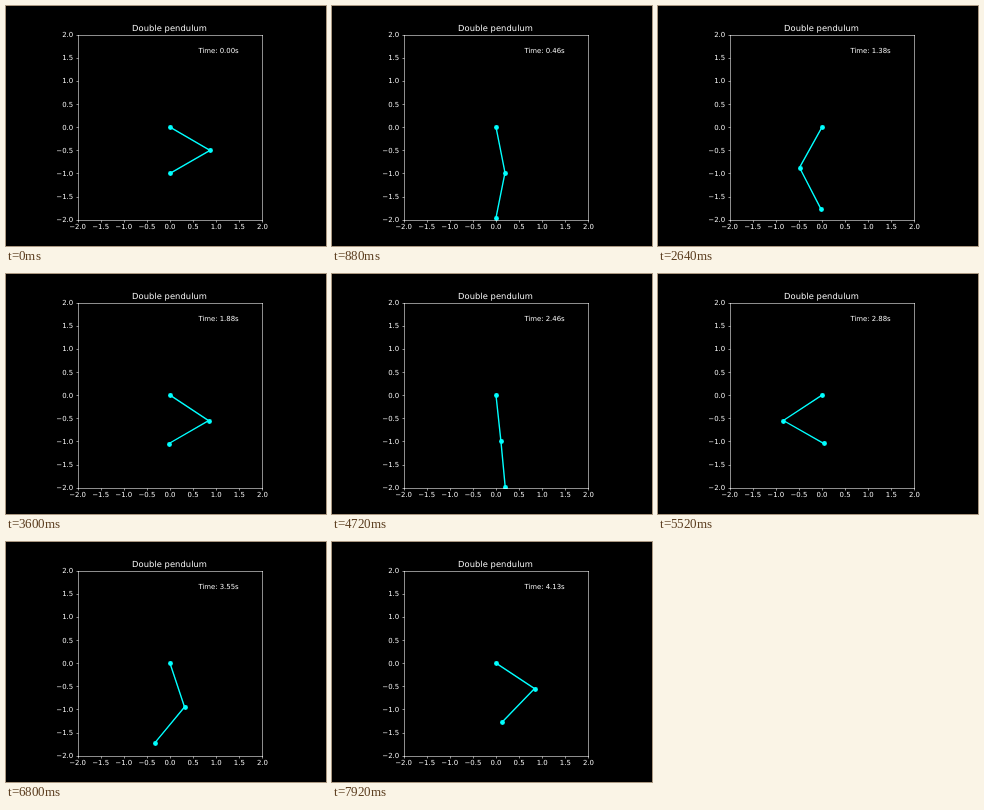
Write an HTML page that moves like this. It is 320 px wide and 240 px high and loops after 8 s.

```html
<!DOCTYPE html>
<html lang="en">
<head>
<meta charset="utf-8">
<title>Double pendulum</title>
<style>
  html, body { margin: 0; width: 100%; height: 100%; overflow: hidden; background: #000; }
  svg { display: block; width: 320px; height: 240px; }
  text { font: 6.944px "DejaVu Sans", sans-serif; fill: #fff; text-rendering: geometricPrecision; white-space: pre; }
  .title { font-size: 8.333px; letter-spacing: .06px; }
  #clock { letter-spacing: -.03px; }
  .x { text-anchor: middle; }
  .y { text-anchor: end; }
  .axes { fill: none; stroke: #fff; stroke-width: .556; }
  .spine { stroke-linecap: square; }
  #rods { fill: none; stroke: #0ff; stroke-width: 1.389; stroke-linejoin: round; }
  circle { fill: #0ff; }
</style>
</head>
<body>
<svg viewBox="0 0 320 240">
  <clipPath id="plot"><rect x="72" y="29" width="185" height="186"/></clipPath>
  <g clip-path="url(#plot)">
    <polyline id="rods"/>
    <circle r="2.43"/><circle r="2.43"/><circle r="2.43"/>
  </g>
  <path class="axes" id="ticks"/>
  <path class="axes spine" d="M72.5 29.5V214.5M256.5 29.5V214.5"/>
  <path class="axes spine" d="M72.5 29.5H256.5M72.5 214.5H256.5"/>
  <g id="labels"></g>
  <text class="title" x="126" y="25">Double pendulum</text>
  <text id="clock" x="192.4" y="47"></text>
</svg>
<script>
const G = 9.8, FRAMES = 100, FRAME_MS = 80, DT = 30 / 719, SUBSTEPS = 20;
const px = x => 164 + 46.2 * x;
const py = y => 121.2 - 46.2 * y;
const snap = v => Math.floor(v + 0.5) + 0.5;
const $ = id => document.getElementById(id);

// Ticks and their labels
let d = '', labels = '';
for (let v = -2; v <= 2; v += 0.5) {
  const name = v.toFixed(1).replace('-', '\u2212');
  d += `M${snap(px(v))} 214.5v2M72.5 ${snap(py(v))}h-2`;
  labels += `<text class="x" x="${px(v)}" y="223">${name}</text>` +
            `<text class="y" x="67.2" y="${Math.round(py(v) + 2.4)}">${name}</text>`;
}
$('ticks').setAttribute('d', d);
$('labels').innerHTML = labels;

// Equal masses and unit rods; state is [angle1, angle2, speed1, speed2]
function slope([a, b, u, w]) {
  const c = Math.cos(a - b), s = Math.sin(a - b), k = 2 - c * c;
  const p = -2 * G * Math.sin(a) - w * w * s;
  const q = -G * Math.sin(b) + u * u * s;
  return [u, w, (p - c * q) / k, (2 * q - c * p) / k];
}
const add = (s, r, h) => s.map((v, i) => v + r[i] * h);

function rk4(s, h) {
  const k1 = slope(s), k2 = slope(add(s, k1, h / 2));
  const k3 = slope(add(s, k2, h / 2)), k4 = slope(add(s, k3, h));
  return s.map((v, i) => v + h / 6 * (k1[i] + 2 * k2[i] + 2 * k3[i] + k4[i]));
}

const states = [[Math.PI / 3, -Math.PI / 3, 0, 0]];
while (states.length < FRAMES) {
  let s = states[states.length - 1];
  for (let i = 0; i < SUBSTEPS; i++) s = rk4(s, DT / SUBSTEPS);
  states.push(s);
}

const dots = document.querySelectorAll('circle');
let shown = -1;

function draw(now) {
  const n = Math.floor(now / FRAME_MS) % FRAMES;
  if (n !== shown) {
    shown = n;
    const [a, b] = states[n];
    const x = Math.sin(a), y = -Math.cos(a);
    const joints = [[0, 0], [x, y], [x + Math.sin(b), y - Math.cos(b)]]
      .map(([u, v]) => [px(u), py(v)]);
    $('rods').setAttribute('points', joints.join(' '));
    // Dots sit on pixel centres
    joints.forEach(([u, v], i) => {
      dots[i].setAttribute('cx', snap(u));
      dots[i].setAttribute('cy', snap(v));
    });
    $('clock').textContent = `Time: ${(n * DT).toFixed(2)}s`;
  }
  requestAnimationFrame(draw);
}
draw(0);
</script>
</body>
</html>
```
